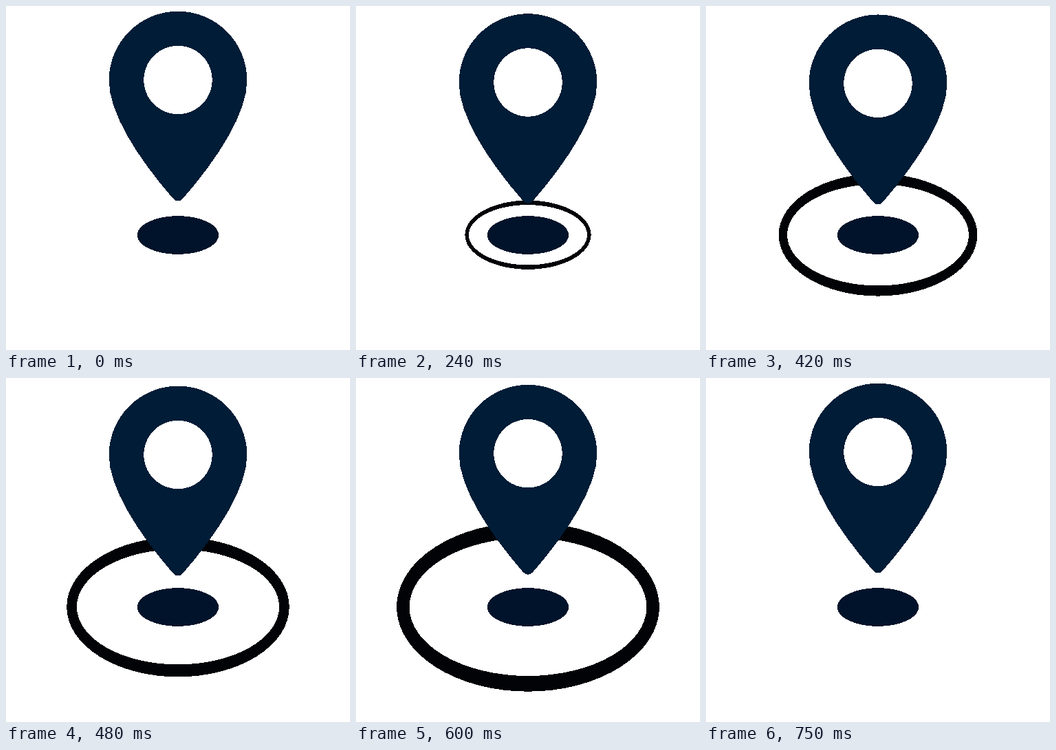
These frames come from a looping animation (500 px wide and 500 px high, 810 ms). An HTML page:

```html
<!DOCTYPE html>
<html lang="en">
<head>
<meta charset="utf-8">
<title>Map pin</title>
<style>
  html, body { margin: 0; width: 100%; height: 100%; overflow: hidden; background: #fff; }
  svg { display: block; width: 100%; height: 100%; shape-rendering: crispEdges; }
</style>
</head>
<body>
<svg viewBox="0 0 500 500">
  <path id="ring" fill="#020307" fill-rule="evenodd"/>
  <ellipse cx="250" cy="333" rx="59.2" ry="27.9" fill="#00132a"/>
  <g id="pin">
    <path fill="#001c36" d="M149.6 108A100.4 100.4 0 0 1 350.4 108C350.4 155 309.6 219.5 257.6 279.4C253.5 285 246.5 285 242.4 279.4C190.4 219.5 149.6 155 149.6 108Z"/>
    <circle cx="250" cy="107.5" r="49.7" fill="#fff"/>
  </g>
</svg>
<script>
  const LOOP = 810, STEP = 30, END = 750;
  const CX = 250, CY = 332.7, DIP = 5.5;
  const ring = document.getElementById('ring');
  const pin = document.getElementById('pin');

  const smooth = p => p * p * (3 - 2 * p);
  const mix = (a, b, p) => a + (b - a) * p;
  const oval = (rx, ry) =>
    `M${CX - rx} ${CY}a${rx} ${ry} 0 1 0 ${2 * rx} 0a${rx} ${ry} 0 1 0 ${-2 * rx} 0Z`;

  function draw(ms) {
    const t = Math.min(END, Math.floor(ms % LOOP / STEP) * STEP);
    const p = t / END;

    // The pin dips and returns at constant speed.
    pin.setAttribute('transform', `translate(0 ${DIP * (1 - Math.abs(2 * p - 1))})`);

    // The ring grows from beneath the shadow, then vanishes at once.
    const s = smooth(p);
    const rx = mix(55, 206.6, s), ry = mix(23.2, 134.6, s);
    const wx = mix(0.8, 20.5, s), wy = mix(0.5, 25.3, s);
    ring.setAttribute('d', p < 1 ? oval(rx, ry) + oval(rx - wx, ry - wy) : '');
  }

  const start = performance.now();
  function tick() {
    draw(performance.now() - start);
    requestAnimationFrame(tick);
  }
  draw(0);
  requestAnimationFrame(tick);
</script>
</body>
</html>
```
